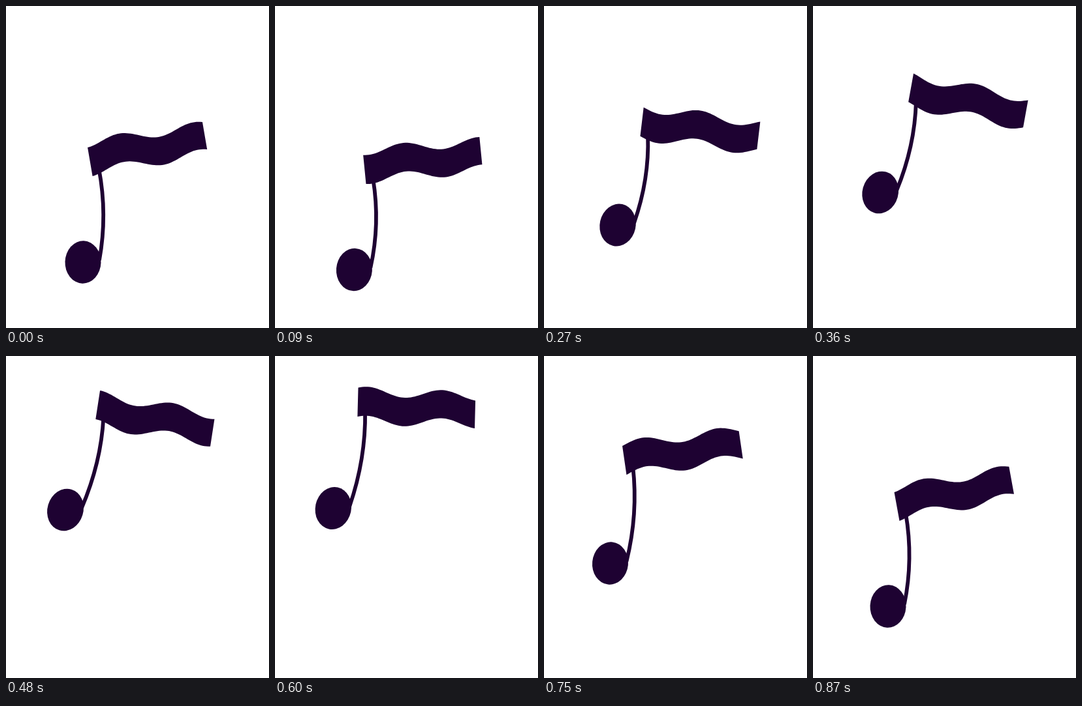
Animation of 403x494 px, one loop 900 ms. Source, as an HTML page:

```html
<!DOCTYPE html>
<html lang="en">
<head>
<meta charset="utf-8">
<title>Waving note</title>
<style>
  html, body { margin: 0; width: 100%; height: 100%; overflow: hidden; background: #fff; }
  svg { display: block; width: 403px; height: 494px; }
</style>
</head>
<body>
<svg viewBox="0 0 403 494" fill="#1e0232">
  <path id="stem" fill="none" stroke="#1e0232" stroke-width="5.8"/>
  <ellipse id="head" rx="27.5" ry="32.7"/>
  <path id="flag"/>
</svg>
<script>
const LOOP = 900, STEP = 30;
const WIDTH = 180, WAVE = 115, AMP = 7.1;
const stem = document.getElementById('stem');
const head = document.getElementById('head');
const flag = document.getElementById('flag');

// time, head centre x y, flag corner x y
const keys = [
  [0, 118, 393, 123.9, 210.4],
  [90, 121.4, 404.5, 134.5, 222],
  [180, 120.2, 381, 146, 199],
  [360, 103.2, 286, 153.3, 107.6],
  [480, 91, 236, 143, 59.9],
  [540, 88.2, 227.3, 134.8, 49.3],
  [600, 89.3, 233.5, 127.4, 53.7],
  [750, 101.5, 318, 119.8, 136.5],
  [870, 115, 384, 123.4, 203]
];

// Key by index, wrapped around the loop
function key(i) {
  const n = keys.length, turn = Math.floor(i / n);
  const [t, ...v] = keys[i - turn * n];
  return { t: t + turn * LOOP, v };
}

function slope(i, c) {
  const a = key(i - 1), b = key(i), d = key(i + 1);
  const h0 = b.t - a.t, h1 = d.t - b.t;
  return (h1 * (b.v[c] - a.v[c]) / h0 + h0 * (d.v[c] - b.v[c]) / h1) / (h0 + h1);
}

// Smooth periodic curve through the keys
function pose(t) {
  let i = keys.length - 1;
  while (keys[i][0] > t) i--;
  const a = key(i), b = key(i + 1), h = b.t - a.t, u = (t - a.t) / h, w = 1 - u;
  return a.v.map((p, c) =>
    p * w * w * (1 + 2 * u) + b.v[c] * u * u * (3 - 2 * u) +
    h * u * w * (w * slope(i, c) - u * slope(i + 1, c)));
}

function draw(t) {
  const [hx, hy, fx, fy] = pose(t);
  const rot = 10.5 * Math.PI / 180 * Math.cos(2 * Math.PI * (t - 395) / LOOP);
  const crest = 52 + WAVE * t / LOOP;
  const cos = Math.cos(rot), sin = Math.sin(rot);
  const top = x => 0.019 * x - AMP * Math.cos(2 * Math.PI * (x - crest) / WAVE);
  const place = (x, y) => [fx + x * cos - y * sin, fy + x * sin + y * cos];
  const text = p => p.map(n => n.toFixed(2)).join(' ');

  const upper = [], lower = [];
  for (let x = 0; x <= WIDTH; x += 3) {
    upper.push(text(place(x, top(x))));
    lower.unshift(text(place(x, top(x) + 44.6 - 2 * x / WIDTH)));
  }
  flag.setAttribute('d', 'M' + upper.concat(lower).join('L') + 'Z');

  const [tx, ty] = place(11.5, top(11.5) + 38);
  const bx = hx + 25, by = hy - 3;
  const bend = [(tx + bx) / 2 + 13, (ty + by) / 2];
  stem.setAttribute('d', `M${text([tx, ty])}Q${text(bend)} ${text([bx, by])}`);

  const lean = Math.atan2(fx - hx, hy - fy) * 180 / Math.PI;
  head.setAttribute('transform', `translate(${text([hx, hy])}) rotate(${lean.toFixed(2)})`);
}

const start = performance.now();
function tick() {
  const t = (performance.now() - start) % LOOP;
  draw(Math.floor(t / STEP) * STEP);
  requestAnimationFrame(tick);
}
tick();
</script>
</body>
</html>
```
